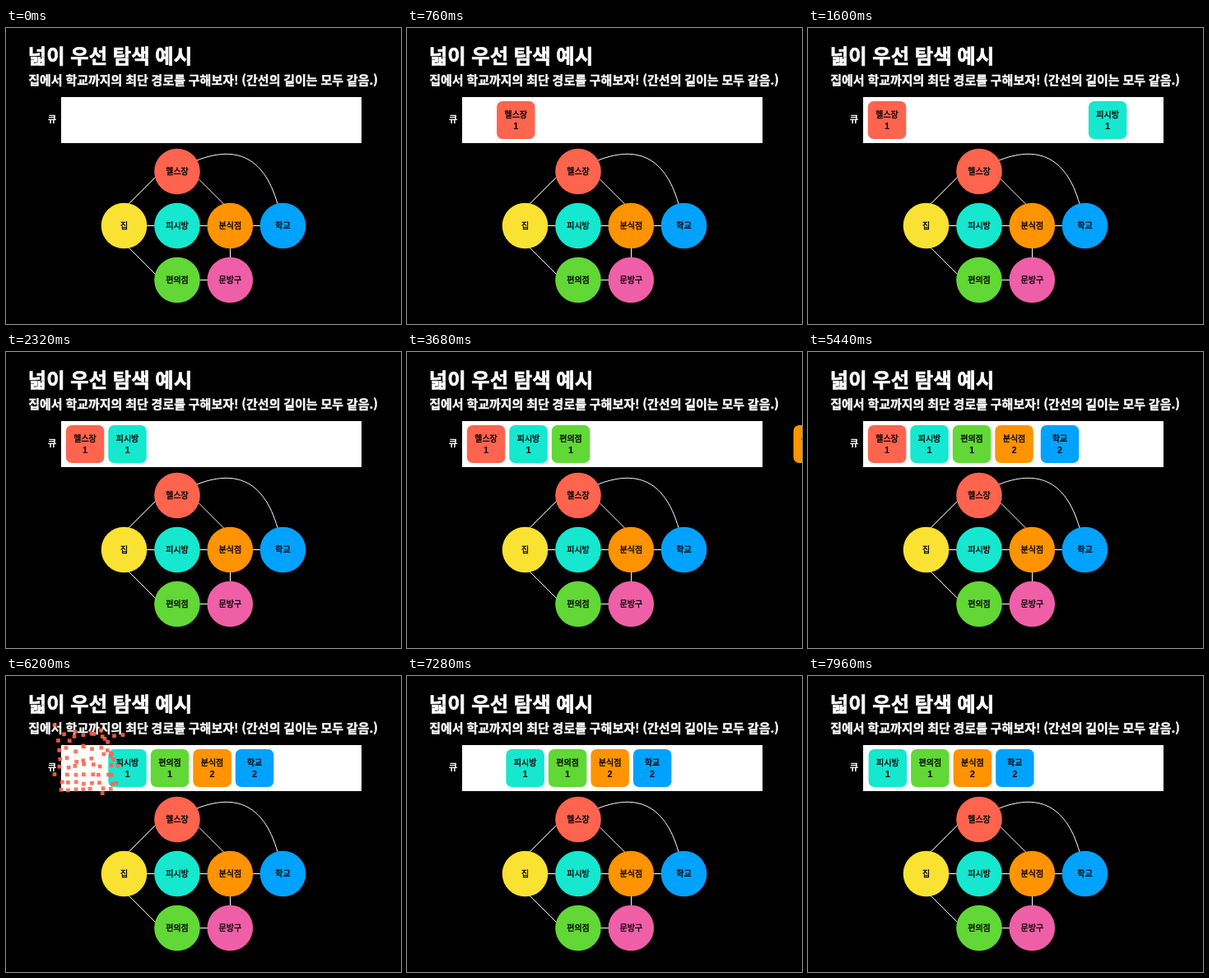
These frames come from a looping animation (480x360 px, 8000 ms). An HTML page:

```html
<!DOCTYPE html>
<html lang="ko">
<head>
<meta charset="utf-8">
<title>넓이 우선 탐색 예시</title>
<style>
  html, body { margin: 0; width: 100%; height: 100%; overflow: hidden; background: #000; }
  svg { display: block; width: 480px; height: 360px; }
  text { font: 10px "Noto Sans CJK KR", "Noto Sans CJK", sans-serif; stroke: #000; stroke-width: .35; }
  .white { fill: #fff; }
  .title, .sub, .queue { font-weight: bold; stroke: #fff; }
  .title { font-size: 24.3px; stroke-width: .7; }
  .sub { font-size: 15px; stroke-width: .4; word-spacing: -.4px; }
  .queue { font-size: 11.5px; stroke-width: 0; }
  .mid { text-anchor: middle; }
  .num { font: bold 11px "Liberation Sans", Arial, sans-serif; stroke: none; }
  .edges { fill: none; stroke: #fff; stroke-width: 1; }
</style>
</head>
<body>
<svg viewBox="0 0 480 360">
  <text class="white title" x="26.8" y="42.6">넓이 우선 탐색 예시</text>
  <text class="white sub" x="27.2" y="68.8">집에서 학교까지의 최단 경로를 구해보자! (간선의 길이는 모두 같음.)</text>
  <text class="white queue mid" x="56" y="115.2">큐</text>
  <rect class="white" x="67" y="84" width="365" height="56"/>
  <path class="edges" d="M149 214L182 181M149 267L182 300M234 183.5L265 214.5
    M143 240.5H336M208 306.5H272M272.5 240V306M232 161C275.5 144 312.5 152.5 330 214"/>
  <g id="nodes"></g>
  <g id="cards"></g>
  <g id="bits"></g>
</svg>
<script>
const RED = '#ff644e', TEAL = '#16e7cf', GREEN = '#61d836', ORANGE = '#ff9300', BLUE = '#00a2ff';
const LOOP = 8000, STEP = 1160, FIRST = 171;
const ARRIVE = 641, SETTLE = 345;
const POP = 5920, POP_TIME = 860;
const SHIFT = 7095, SHIFT_TIME = 950;
const LEFT = 72.8, TOP = 89, PITCH = 51.5, SIZE = 46.5;

const byId = id => document.getElementById(id);
const clamp = v => Math.min(1, Math.max(0, v));
const rand = n => { const v = Math.sin(n * 12.9898) * 43758.5453; return v - Math.floor(v); };

const nodes = [
  ['헬스장', RED, 208, 174.5], ['집', '#fae232', 143.5, 240.5], ['피시방', TEAL, 208, 240.5],
  ['분식점', ORANGE, 272.3, 240.5], ['학교', BLUE, 336.5, 240.5],
  ['편의점', GREEN, 208, 306.5], ['문방구', '#ef5fa7', 272.3, 306.5]
];
byId('nodes').innerHTML = nodes.map(([name, color, x, y]) =>
  `<circle cx="${x}" cy="${y}" r="27.8" fill="${color}"/>
   <text class="mid" x="${x}" y="${y + 3.4}">${name}</text>`).join('');

const queue = [
  ['헬스장', RED, 1], ['피시방', TEAL, 1], ['편의점', GREEN, 1], ['분식점', ORANGE, 2], ['학교', BLUE, 2]
];
byId('cards').innerHTML = queue.map(([name, color, depth]) =>
  `<g><rect width="${SIZE}" height="46" rx="7" fill="${color}"/>
   <text class="mid" x="23.2" y="19.7">${name}</text>
   <text class="mid num" x="23.2" y="34">${depth}</text></g>`).join('');
const cards = [...byId('cards').children];

// Pieces the first card breaks into when it leaves the queue
const GRID = 8, CELL = SIZE / GRID;
byId('bits').innerHTML = `<rect fill="${RED}"/>`.repeat(GRID * GRID);
const bits = [...byId('bits').children];

// Accelerating slide from the right edge, then one small overshoot
function slideX(i, t) {
  const rest = LEFT + PITCH * i;
  if (t < ARRIVE) return 480 + (rest - 480) * (0.001367 * t + 3e-7 * t * t);
  const u = clamp((t - ARRIVE) / SETTLE);
  return rest - (11 + 0.3 * i) * u * (1 - u) ** 4 / 0.08192;
}

function shift(t) {
  const u = clamp((t - SHIFT) / SHIFT_TIME);
  return PITCH * (u < 0.5 ? 2 * u * u : 1 - 2 * (1 - u) ** 2);
}

function drawBits(t) {
  const u = (t - POP) / POP_TIME;
  const on = u > 0 && u < 1;
  byId('bits').style.display = on ? '' : 'none';
  if (!on) return;
  const out = 1 - (1 - u) ** 2;
  bits.forEach((bit, k) => {
    const col = k % GRID, row = Math.floor(k / GRID);
    const reach = out * (0.35 + 0.65 * rand(k + 1));
    const size = (CELL + 0.3) * (1 - 0.7 * u);
    const pad = (CELL - size) / 2;
    bit.setAttribute('x', LEFT + col * CELL + pad + reach * (81 * col / (GRID - 1) - 32));
    bit.setAttribute('y', TOP + row * CELL + pad + reach * (83 * row / (GRID - 1) - 62));
    bit.setAttribute('width', size);
    bit.setAttribute('height', size);
    bit.setAttribute('opacity', 1 - u * u);
  });
}

function draw(now) {
  const t = now % LOOP;
  cards.forEach((card, i) => {
    const age = t - FIRST - STEP * i;
    const fade = i ? 1 : clamp(1 - (t - POP) / 250);
    card.style.display = age > 0 && fade > 0 ? '' : 'none';
    card.setAttribute('opacity', fade);
    const x = slideX(i, age) - (i ? shift(t) : 0);
    card.setAttribute('transform', `translate(${x} ${TOP})`);
  });
  drawBits(t);
}

const start = performance.now();
function tick() {
  draw(performance.now() - start);
  requestAnimationFrame(tick);
}
tick();
</script>
</body>
</html>
```
